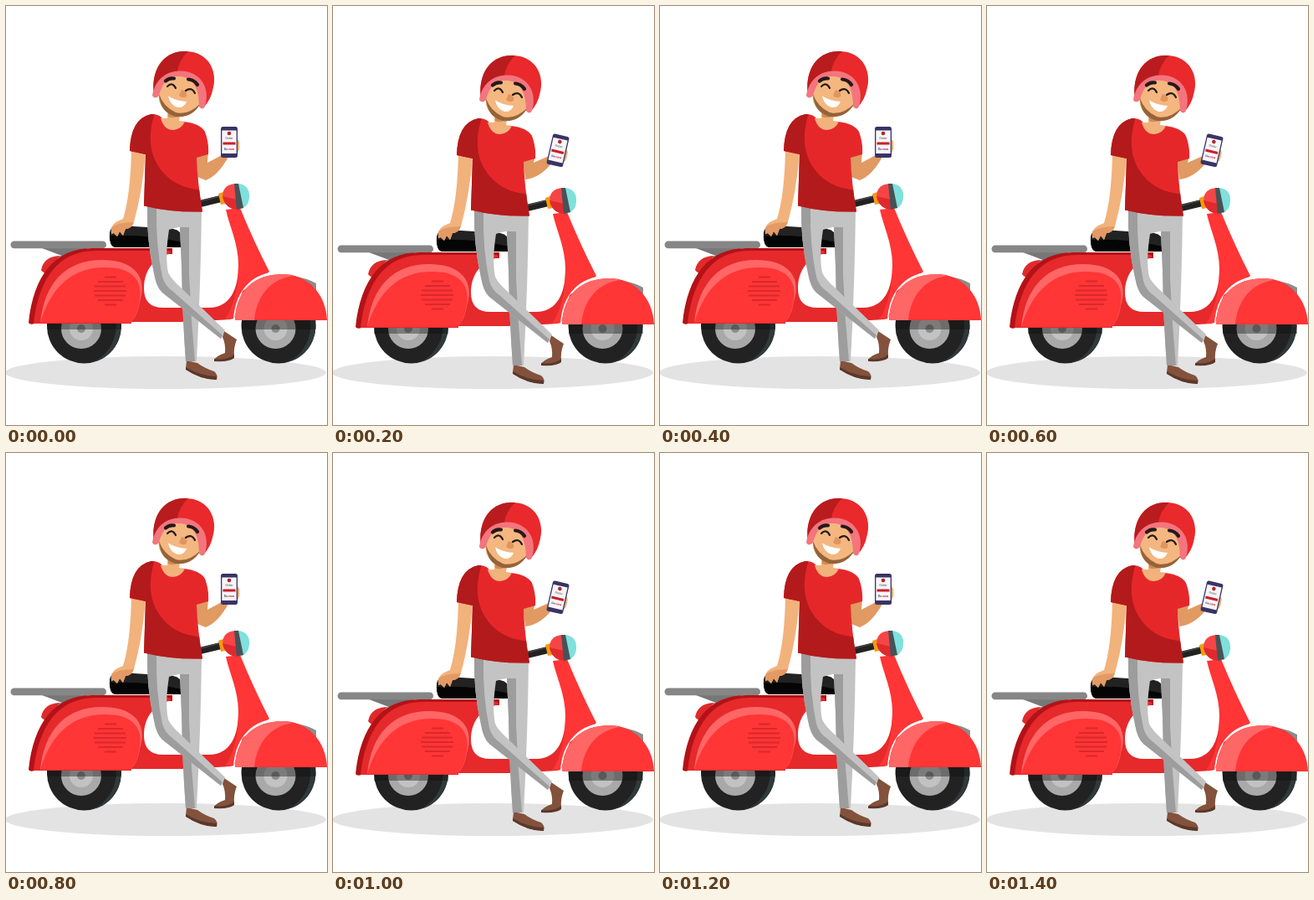
An HTML page that plays this animation: 384x500 px, repeating every 1.6 s.

```html
<!DOCTYPE html>
<html lang="en">
<head>
<meta charset="utf-8">
<title>Scooter rider</title>
<style>
html, body { margin: 0; width: 100%; height: 100%; overflow: hidden; background: #fff; }
svg { display: block; width: 100%; height: 100%; }
text { font: bold 3.4px Inter, sans-serif; text-anchor: middle; }
</style>
</head>
<body>
<svg viewBox="0 0 384 500">
  <defs>
    <g id="wheel">
      <circle r="44.5" fill="#222"/>
      <path d="M9 -43.5A44.5 44.5 0 0 1 9 43.5A47 47 0 0 0 9 -43.5" fill="#303a3a"/>
      <g transform="translate(-3.5 3)">
        <circle r="24" fill="#a9a9a9"/>
        <circle r="14" fill="#c2c2c2"/>
        <circle r="5" fill="#8a8a8a"/>
      </g>
    </g>
    <clipPath id="helmetClip">
      <path d="M177 107C173 76 188 54 214 54C241 54 253 76 248 97Q245 113 236 121C239 96 226 82 207 82Q191 82 177 107Z"/>
    </clipPath>
    <clipPath id="shirtClip">
      <path d="M174 129Q186 129 188 137Q198 146 213 138Q232 140 238 150Q243 163 242 177L228 181Q229 210 235 245.5Q198 246.5 165 238.5L167 177L148 173Q149 134 174 129Z"/>
    </clipPath>
  </defs>

  <ellipse cx="191" cy="437.5" rx="192" ry="19.5" fill="#e3e3e3"/>
  <use href="#wheel" x="93.5" y="382"/>
  <use href="#wheel" x="326" y="382"/>

  <g id="ride">
    <!-- scooter -->
    <path d="M49 374H138V386H49ZM282 374H371V386H282Z" fill="#111" opacity=".4"/>
    <path d="M43 289H98L72 300Z" fill="#777"/>
    <rect x="5.5" y="280.5" width="114.5" height="8.7" rx="4.3" fill="#868686"/>
    <path d="M64 298L50 319L58 318L76 300Z" fill="#868686"/>
    <path d="M64 298Q45 299 42 315Q45 320 52 319Z" fill="#df2a2c"/>
    <path d="M27 378C33 322 58 289 103 289H199V296L110 297L34 379Q29 381 27 378Z" fill="#b31217"/>
    <path d="M33 379C39 325 63 292 107 292H196L198 295C178 299 165 315 165 337Q165 360 188 360H243C268 360 278 338 278 309L300 330L272 373Q265 375 240 375L210 377H150V379Z" fill="#e6292b"/>
    <path d="M263 243L280 241Q296 280 315 317L286 342L272 373L262 374Q278 350 278 309C278 283 267 262 263 243Z" fill="#ff3536"/>
    <path d="M41 378C46 330 72 303 115 303C153 303 170 323 160 353Q157 372 148 378Z" fill="#ff6666"/>
    <path d="M41 378C54 335 80 311 120 312C151 312 164 328 160 350Q157 372 148 378Z" fill="#ff3536"/>
    <path d="M118 323.5H132M110 329H140M106 334.5H143M105 340H144M106 345.5H143M110 351H140M118 356.5H132" stroke="#d9282b" stroke-width="1.8"/>
    <path d="M343 322Q361 325 371 331V343L350 338Z" fill="#8c8c8c"/>
    <path d="M272 375C274 337 297 318 325 317H317L283 340Z" fill="#fff"/>
    <path d="M274 375C275 339 297 320 331 320C361 320 383 344 384 375Z" fill="#ff3536"/>
    <path d="M274 375C275 339 297 320 331 320Q338 320 343 322C317 326 300 345 297 375Z" fill="#ff6666"/>
    <path d="M124 270Q126 261 138 262L200 266Q211 268 211 279L209 288L130 288Q123 286 124 270Z" fill="#222"/>
    <path d="M124 274Q170 272 211 282L209 288L130 288Q124 286 124 274Z" fill="#050505"/>
    <path d="M232 236L257 230" stroke="#222" stroke-width="8"/>
    <path d="M233 233L256 227" stroke="#444" stroke-width="1.5"/>
    <path d="M254 224L260 222L263 236L257 237Z" fill="#f59a13"/>
    <path d="M274 212C263 213 257 220 260 231Q264 242 277 243Z" fill="#f64546"/>
    <path d="M259 227L276 231L277 243Q262 242 259 227Z" fill="#df2a2d"/>
    <path d="M276 212C288 212 292 220 291 229Q290 239 282 242Z" fill="#7fe0dc"/>
    <path d="M273 212H278L284 241L276 243Z" fill="#475257"/>

    <!-- trousers and shoes -->
    <path d="M216 423L229 426Q237 432 249 436Q254 440 252 446Q233 446 215 433Z" fill="#83523c"/>
    <path d="M215 431Q234 442 252 442V446Q233 446 215 434Z" fill="#5b382b"/>
    <path d="M261 388L276 398Q272 408 273 418Q269 425 249 423Q250 418 262 414Q263 404 259 395Z" fill="#83523c"/>
    <path d="M249 421Q265 423 273 416V420Q268 425 249 424Z" fill="#5b382b"/>
    <path d="M200 242L234 244Q233 330 228 424L215 424Q211 370 210 310L208 264Z" fill="#c3c3c3"/>
    <path d="M208 264H219V320L222 375L226 424H215Q211 370 210 310Z" fill="#9d9d9d"/>
    <path d="M169 238L226 245L219 263Q206 263 195 267Q190 300 194 318Q197 325 208 335L262 387L257 397L187 342Q180 336 177 319Q168 280 169 238Z" fill="#c3c3c3"/>
    <path d="M169 238L180 241Q179 285 187 323Q190 334 199 340L259 393L257 397L187 342Q180 336 177 319Q168 280 169 238Z" fill="#9d9d9d"/>

    <!-- arms -->
    <path d="M150 171L167 176Q163 222 153 258Q150 266 143 266L140 274L136 269L133 275L129 271L126 272Q124 262 133 257L140 254Q149 225 150 171Z" fill="#f2b27c"/>
    <path d="M126 264Q134 258 153 258Q150 266 143 266L140 274L136 269L133 275L129 271L126 272Z" fill="#e39a64"/>
    <path id="arm" fill="#e09a62"/>
    <g id="phone">
      <path d="M8 -4Q13 -3 12 3Q13 8 10 13Q3 20 -5 18L-9 14Z" fill="#edac75"/>
      <rect x="-10" y="-18.5" width="20" height="37" rx="2.5" fill="#383466"/>
      <rect x="-8.7" y="-14" width="17.4" height="27.5" fill="#f7f5f8"/>
      <circle cx="0" cy="-10.5" r="2.3" fill="#b4232c"/>
      <text y="-4" fill="#777">Order</text>
      <rect x="-7.5" y="0" width="15" height="3" fill="#c92028"/>
      <text y="9" fill="#39366d">Go <tspan fill="#c92028">now</tspan></text>
    </g>

    <!-- torso -->
    <path d="M193 123L208 130L207 137L214 138Q209 151 196 149Q187 146 186 135L193 134Z" fill="#f2b27c"/>
    <path d="M194 125L207 131Q199 135 194 132Z" fill="#ce8b57"/>
    <g clip-path="url(#shirtClip)">
      <path d="M145 125H247V250H145Z" fill="#e6272a"/>
      <path d="M145 125H179C171 147 170 170 181 189Q198 218 237 220V250H145Z" fill="#b31a1b"/>
    </g>
    <path d="M185 134Q189 148 200 148Q210 147 214 138Q203 141 194 134Z" fill="#f2b27c"/>

    <!-- head -->
    <path d="M187 88Q210 70 235 94Q239 111 229 121Q218 134 203 131Q188 128 183 113Q181 101 187 88Z" fill="#f4b780"/>
    <path d="M183 105Q188 120 203 127Q218 131 233 116Q223 134 203 132Q184 127 183 105Z" fill="#956338"/>
    <g clip-path="url(#helmetClip)">
      <path d="M170 50H255V125H170Z" fill="#e9292b"/>
      <path d="M222 51Q207 61 204 82L170 111V50Z" fill="#b91c1e"/>
    </g>
    <path d="M175 107C178 88 192 77 209 77.5C233 78 245 98 238 120Q235 125 231 120C231 98 224 85 208 84C193 83 187 93 183 107Q178 112 175 107Z" fill="#f3757d"/>
    <g fill="none" stroke="#24191a" stroke-linecap="round">
      <path d="M191 89.5Q195 85.5 201 86.5M218 87.5Q225 88 229 94" stroke-width="4.2"/>
      <path d="M193 96Q199 90 203 98M215 101Q222 96 226 104" stroke-width="2.2"/>
    </g>
    <path d="M210 100Q218 102 216 108Q212 111 207 107Z" fill="#df955f"/>
    <path d="M194 107.5Q205 114 216 114Q213 122 205 121Q196 118 194 107.5Z" fill="#fff"/>
  </g>
</svg>
<script>
const el = id => document.getElementById(id);
const poses = [
  {
    ride: "",
    phone: "translate(267 162.5)",
    arm: "M227 177L242 174L241 187L258 178L266 180Q254 202 239 208L229 204Z"
  },
  {
    ride: "translate(0 5)",
    phone: "translate(269 167.3) rotate(13)",
    arm: "M227 177L242 174L240 182L258 174L262 182Q248 200 230 202Z"
  }
];

function draw() {
  const pose = poses[Math.floor(performance.now() / 200) % 2];
  el("ride").setAttribute("transform", pose.ride);
  el("phone").setAttribute("transform", pose.phone);
  el("arm").setAttribute("d", pose.arm);
  requestAnimationFrame(draw);
}
draw();
</script>
</body>
</html>
```
